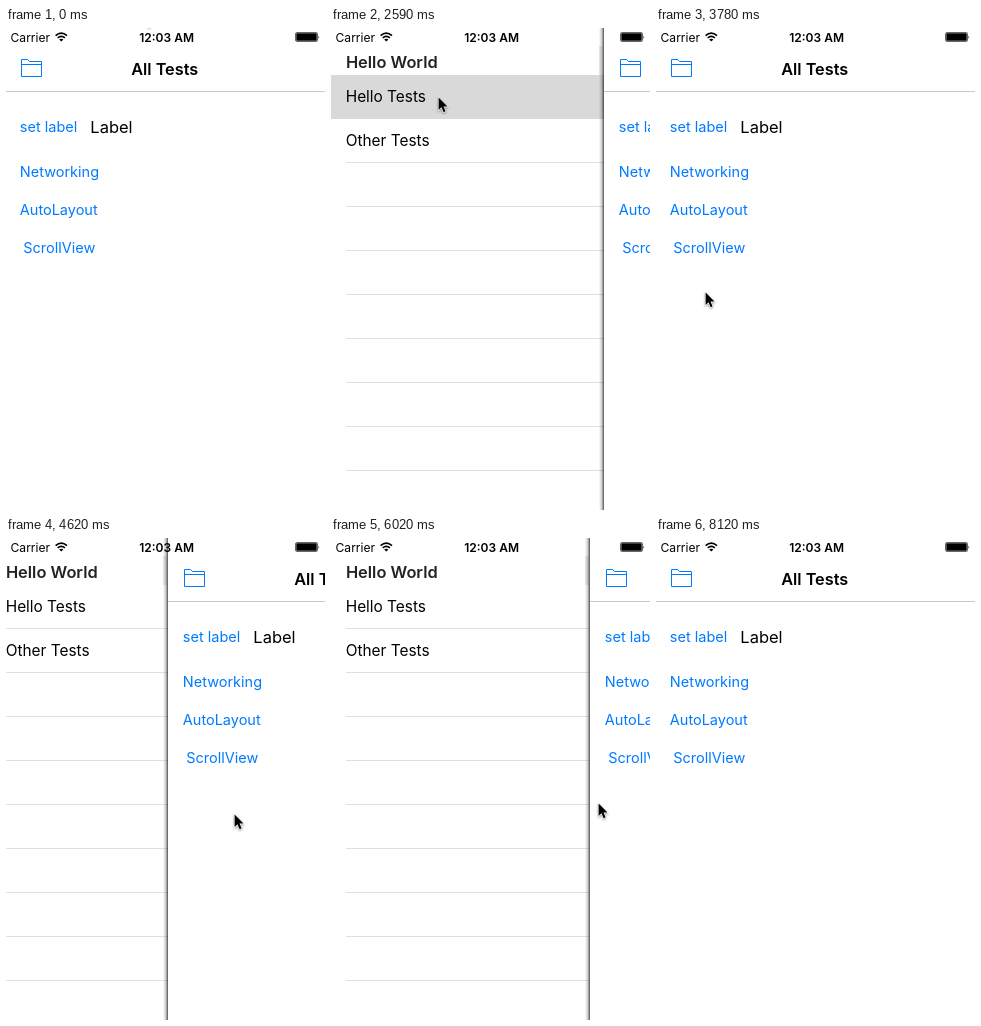
Animation, 319 px wide and 482 px high, one loop 8470 ms. Source, as an HTML page:

```html
<!DOCTYPE html>
<html lang="en">
<head>
<meta charset="utf-8">
<title>Drawer menu</title>
<style>
  html, body { margin: 0; width: 100%; height: 100%; overflow: hidden; background: #fff; }
  svg { display: block; width: 100vw; height: 100vh; font-family: Inter, "Liberation Sans", sans-serif; }
  .link { font-size: 14.5px; fill: #007aff; }
  .cell { font-size: 15.4px; }
  .bold { font-weight: 600; }
  .line { stroke: #e0e0e2; }
  .icon { fill: none; stroke: #007aff; stroke-linejoin: round; }
  .pointer { stroke: #fff; stroke-width: 1.2; paint-order: stroke; filter: drop-shadow(0 1px 1px rgba(0, 0, 0, .4)); }
</style>
</head>
<body>
<svg viewBox="0 0 319 482">
  <defs>
    <linearGradient id="shade">
      <stop offset="0" stop-color="#000" stop-opacity="0"/>
      <stop offset=".55" stop-color="#000" stop-opacity=".2"/>
      <stop offset="1" stop-color="#000" stop-opacity=".68"/>
    </linearGradient>
  </defs>
  <rect width="319" height="482" fill="#fff"/>

  <g id="menu">
    <g id="lines"></g>
    <rect id="row" x="-15" y="47" width="350" height="44" fill="#d9d9d9"/>
    <text class="bold" x="14.9" y="39.7" font-size="16.4" fill="#222">Hello World</text>
    <text class="cell" x="14.7" y="74.3">Hello Tests</text>
    <text class="cell" x="14.7" y="118.3">Other Tests</text>
  </g>

  <g id="page">
    <rect x="-6" y="18" width="4" height="29" fill="#ebebeb"/>
    <rect x="-6" width="5" height="482" fill="url(#shade)"/>
    <rect x="-1" width="320" height="482" fill="#fff"/>
    <path d="M-1 63.5H319" stroke="#c9c9cb"/>
    <path id="folder" class="icon" d="M15.5 48.5V31.5H21.5L23.5 33.5H35.5V48.5ZM15.5 36.5H35.5"/>
    <text class="bold" x="158.7" y="47" font-size="16.3" text-anchor="middle">All Tests</text>
    <text class="link" x="13.8" y="103.6">set label</text>
    <text x="84.3" y="104.5" font-size="16.5">Label</text>
    <text class="link" x="13.8" y="148.6">Networking</text>
    <text class="link" x="13.8" y="186.6">AutoLayout</text>
    <text class="link" x="17.2" y="224.6">ScrollView</text>
  </g>

  <g id="status">
    <text x="4.5" y="13.6" font-size="12.1">Carrier</text>
    <path d="M49.6 7.6Q55.3 2.8 61 7.6M51.7 9.8Q55.3 6.9 58.9 9.8" fill="none" stroke="#000" stroke-width="1.7"/>
    <path d="M53.2 11.4Q55.3 9.9 57.4 11.4L55.3 13.6Z"/>
    <text class="bold" x="160.6" y="13.6" font-size="12" text-anchor="middle">12:03 AM</text>
    <rect x="289.5" y="4.5" width="22" height="9" rx="1.5" fill="none" stroke="#000" stroke-width=".6"/>
    <rect x="290.3" y="5.3" width="20.4" height="7.4" rx=".6"/>
    <path d="M312.5 7.7Q314 9.2 312.5 10.8Z"/>
  </g>

  <path id="pointer" class="pointer" d="M.6.6V13L3.5 10.3 5.6 15.2 7.6 14.3 5.5 9.6H9.5Z"/>
</svg>
<script>
  const LOOP = 8470, STEP = 70, OPEN = 274;
  const TAP_OPEN = 1330, TAP_ROW = 2590, DRAG = 3920, FLICK = 5950, TAP_CLOSE = 6930;
  const el = id => document.getElementById(id);
  const mix = (a, b, p) => a + (b - a) * p;

  // Eased progress from 0 to 1 between two times.
  function glide(t, from, to) {
    const p = Math.min(1, Math.max(0, (t - from) / (to - from)));
    return p * p * (3 - 2 * p);
  }

  // The pointer rests between moves.
  function pointerAt(t) {
    let spot = [137, -16];
    const move = (from, duration, x, y) => {
      const p = glide(t, from, from + duration);
      spot = [mix(spot[0], x, p), mix(spot[1], y, p)];
    };
    move(210, 770, 18, 37);
    move(TAP_OPEN + 210, 770, 107, 69);
    move(TAP_ROW + 210, 630, 104, 237);
    move(TAP_ROW + 840, 350, 49, 264);
    move(DRAG, 350, 222, 276);
    move(DRAG + 630, 350, 282, 278);
    move(FLICK - 560, 210, 282, 265);
    move(FLICK, 70, 267, 265);
    move(FLICK + 70, 280, 165, 12);
    move(TAP_CLOSE - 490, 140, 303, 27);
    move(TAP_CLOSE + 70, 420, 100, 62);
    move(TAP_CLOSE + 630, 560, 133, -22);
    return spot;
  }

  // A drag follows the pointer and settles open once released.
  function drawerAt(t, x) {
    const follow = (grip, release, settled) =>
      Math.min(OPEN, Math.max(0, mix(x - grip, OPEN, glide(t, release, settled))));
    if (t < DRAG) return OPEN * (glide(t, TAP_OPEN, TAP_OPEN + 490) - glide(t, TAP_ROW, TAP_ROW + 420));
    if (t < FLICK) return follow(65, DRAG + 980, DRAG + 1260);
    if (t < TAP_CLOSE) return follow(7, FLICK + 140, FLICK + 350);
    return OPEN * (1 - glide(t, TAP_CLOSE, TAP_CLOSE + 420));
  }

  function folderOpacity(t) {
    const tap = t < TAP_CLOSE ? TAP_OPEN : TAP_CLOSE;
    return t < tap ? 1 : mix(.25, 1, glide(t, tap + 70, tap + 350));
  }

  const place = (id, x, y = 0) =>
    el(id).setAttribute('transform', `translate(${Math.round(x)} ${Math.round(y)})`);

  el('lines').innerHTML = Array.from({ length: 9 }, (_, i) =>
    `<path class="line" d="M15 ${90.5 + 44 * i}H340"/>`).join('');

  function draw(now) {
    const t = Math.floor(now % LOOP / STEP) * STEP;
    const [x, y] = pointerAt(t);
    const offset = drawerAt(t, x);
    place('pointer', x, y);
    place('page', offset);
    place('menu', offset < 210 ? -15 : 0);
    el('folder').style.opacity = folderOpacity(t);
    el('row').style.opacity = t >= TAP_ROW && t < DRAG ? 1 : 0;
  }

  let start;
  function tick(now) {
    start ??= now;
    draw(now - start);
    requestAnimationFrame(tick);
  }
  draw(0);
  requestAnimationFrame(tick);
</script>
</body>
</html>
```
